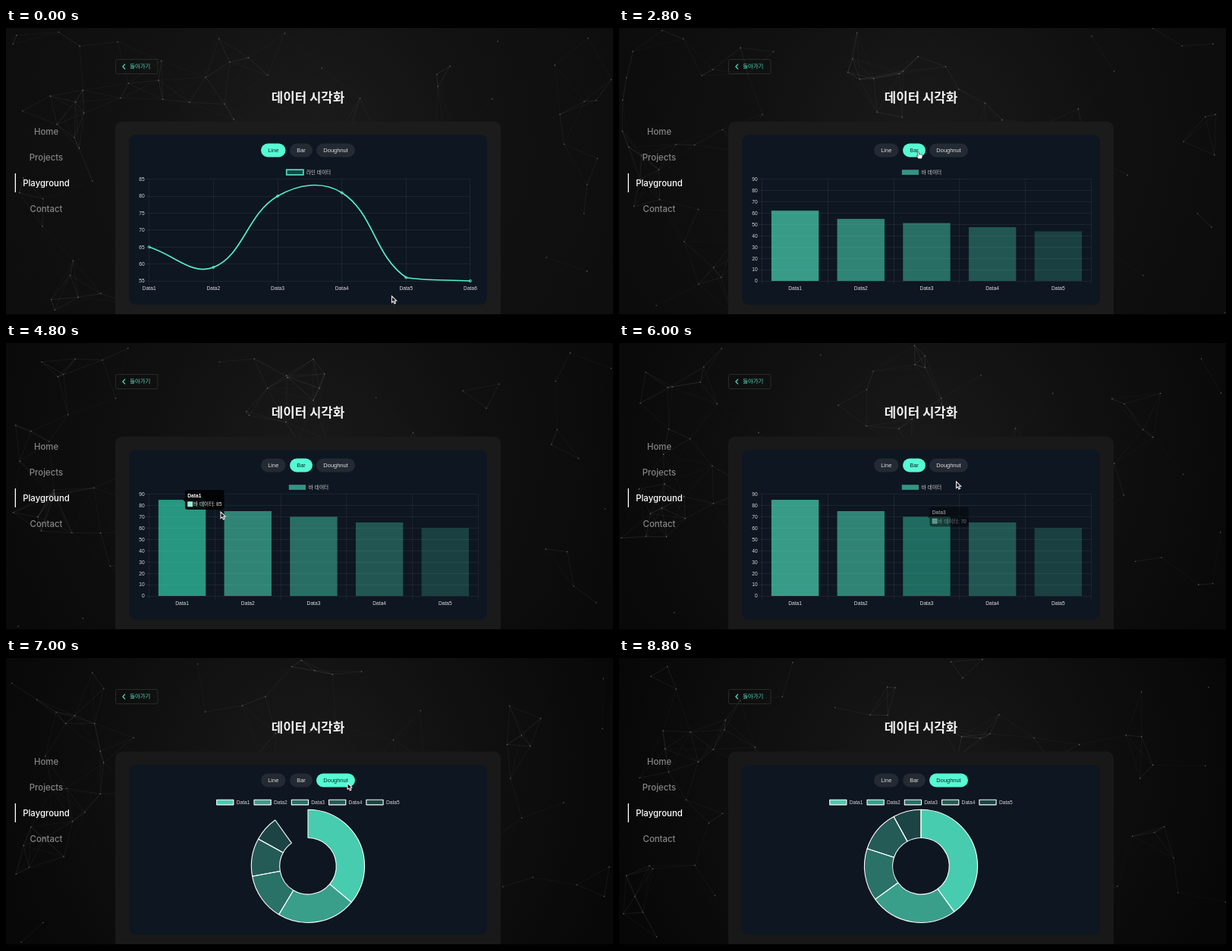
An HTML page with a canvas for the animation above (8.9 s loop, 800 by 379 pixels).

```html
<!DOCTYPE html>
<html lang="ko">
<head>
<meta charset="utf-8">
<title>데이터 시각화</title>
<style>
html, body { margin: 0; width: 100%; height: 100%; overflow: hidden; background: #0d0d0d; }
canvas { display: block; width: 800px; height: 379px; }
</style>
</head>
<body>
<canvas id="stage"></canvas>
<script>
const W = 800, H = 379, LOOP = 8900, STEP = 100;
const BAR_START = 2520, DOUGHNUT_START = 6560;
const SANS = '"Liberation Sans", "Noto Sans CJK KR", "Noto Sans CJK", sans-serif';
const KOREAN = '"Noto Sans CJK KR", "Noto Sans CJK", sans-serif';
const accent = alpha => `rgba(86,251,211,${alpha})`;
const lineValues = [65, 59, 80, 81, 56, 55];
const barValues = [85, 75, 70, 65, 60];
const shares = [.4, .25, .15, .12, .08];
const shareAlphas = [.8, .6, .4, .3, .2];
const LEFT = 188.7, TOP = 199.6, BOTTOM = 334;

const canvas = document.getElementById('stage');
const dpr = window.devicePixelRatio || 1;
canvas.width = W * dpr;
canvas.height = H * dpr;
const ctx = canvas.getContext('2d');
ctx.scale(dpr, dpr);

const clamp = v => Math.max(0, Math.min(1, v));
const mix = (a, b, p) => a + (b - a) * p;
const easeOut = p => 1 - (1 - clamp(p)) ** 4;
const smooth = p => p * p * (3 - 2 * p);

function text(str, x, y, size, color, align = 'center', weight = 400, family = SANS) {
  ctx.font = `${weight} ${size}px ${family}`;
  ctx.fillStyle = color;
  ctx.textAlign = align;
  ctx.textBaseline = 'alphabetic';
  ctx.fillText(str, x, y);
}

function box(x, y, w, h, r, fill, stroke, width = 1.1) {
  ctx.beginPath();
  ctx.roundRect(x, y, w, h, r);
  if (fill) { ctx.fillStyle = fill; ctx.fill(); }
  if (stroke) { ctx.strokeStyle = stroke; ctx.lineWidth = width; ctx.stroke(); }
}

function line(points, color, width) {
  ctx.beginPath();
  points.forEach(([x, y]) => ctx.lineTo(x, y));
  ctx.strokeStyle = color;
  ctx.lineWidth = width;
  ctx.stroke();
}

// Drifting particle network
let seed = 29;
const random = () => (seed = seed * 16807 % 2147483647) / 2147483647;
const particles = Array.from({ length: 100 }, () => {
  const angle = random() * Math.PI * 2, speed = 12 + random() * 22;
  return { x: random() * W, y: random() * H, vx: Math.cos(angle) * speed, vy: Math.sin(angle) * speed };
});
const bounce = (v, size) => {
  const m = ((v % (2 * size)) + 2 * size) % (2 * size);
  return m < size ? m : 2 * size - m;
};

function drawNetwork(t) {
  const reach = 70;
  const spots = particles.map(p => [bounce(p.x + p.vx * t / 1000, W), bounce(p.y + p.vy * t / 1000, H)]);
  spots.forEach((a, i) => {
    for (const b of spots.slice(i + 1)) {
      const d = Math.hypot(a[0] - b[0], a[1] - b[1]);
      if (d < reach) line([a, b], `rgba(190,190,190,${.04 + .2 * (1 - d / reach)})`, .6);
    }
    ctx.fillStyle = 'rgba(210,210,210,.38)';
    ctx.beginPath();
    ctx.arc(a[0], a[1], .8, 0, 7);
    ctx.fill();
  });
}

function drawPage(t) {
  const dim = t / LOOP;
  const gray = v => `rgb(${v},${v},${v})`;
  const glow = ctx.createRadialGradient(400, 150, 20, 400, 150, 430);
  glow.addColorStop(0, gray(27 - 3 * dim));
  glow.addColorStop(.5, gray(18 - 3 * dim));
  glow.addColorStop(1, gray(14 - 7 * dim));
  ctx.fillStyle = glow;
  ctx.fillRect(0, 0, W, H);
  drawNetwork(t);

  box(144, 123.5, 508, 270, 9, gray(28 - 4 * dim));
  box(162, 141, 472, 224.5, 9, '#0e1621');
  ctx.fillStyle = '#000';
  ctx.fillRect(0, 378, W, 1);

  box(144.5, 41.5, 55.5, 19, 2, null, '#2d3332', .8);
  line([[157, 47.7], [153.9, 51], [157, 54.3]], accent(.9), 1.2);
  text('돌아가기', 176.8, 53.4, 7.4, accent(.88), 'center', 500, KOREAN);
  text('데이터 시각화', 398, 98, 16.8, '#f2f2f2', 'center', 700, KOREAN);

  ['Home', 'Projects', 'Playground', 'Contact'].forEach((label, i) =>
    text(label, 53, 140.7 + i * 34, 11.4, i === 2 ? '#fff' : '#858585', 'center', 500, 'Inter, sans-serif'));
  ctx.fillStyle = '#fff';
  ctx.fillRect(11.7, 192, 1.3, 25);
}

function drawButtons(active) {
  [['Line', 336, 32.5], ['Bar', 374, 30], ['Doughnut', 409, 51]].forEach(([label, x, w], i) => {
    box(x, 152.5, w, 18, 9, i === active ? accent(1) : '#242a34');
    text(label, x + w / 2, 164.1, 7.45, i === active ? '#16202a' : '#dedede');
  });
}

function drawLegend(label, x, fill, stroke, width) {
  box(x, 187.2, 22.2, 6.7, 0, fill, stroke, width);
  text(label, x + 26, 192.9, 6.67, '#d4d4d4', 'left');
}

function drawGrid(xs, right, yMin, yMax, yStep) {
  const color = 'rgba(255,255,255,.1)';
  const snap = v => Math.round(v) + .5;
  for (let v = yMin; v <= yMax; v += yStep) {
    const y = mix(BOTTOM, TOP, (v - yMin) / (yMax - yMin));
    line([[LEFT - 4.5, snap(y - .5)], [right, snap(y - .5)]], color, .6);
    text(v, 182.7, y + 2.4, 6.67, '#dcdcdc', 'right');
  }
  xs.forEach(x => line([[snap(x - .5), TOP], [snap(x - .5), BOTTOM + 4.5]], color, .6));
}

function drawLineChart() {
  const points = lineValues.map((v, i) => [LEFT + i * 84.65, mix(BOTTOM, TOP, (v - 55) / 30)]);
  drawGrid(points.map(p => p[0]), 612, 55, 85, 5);
  drawLegend('라인 데이터', 369.7, accent(.2), accent(.85), 1.7);

  const distance = (a, b) => Math.hypot(a[0] - b[0], a[1] - b[1]);
  const handles = points.map((p, i) => {
    const before = points[i - 1] || p, after = points[i + 1] || p;
    const d1 = distance(before, p), d2 = distance(p, after);
    const handle = k => [
      p[0] + k * (after[0] - before[0]),
      Math.max(TOP, Math.min(BOTTOM, p[1] + k * (after[1] - before[1])))
    ];
    return { into: handle(-.4 * d1 / (d1 + d2)), out: handle(.4 * d2 / (d1 + d2)) };
  });
  ctx.beginPath();
  ctx.moveTo(...points[0]);
  for (let i = 1; i < points.length; i++)
    ctx.bezierCurveTo(...handles[i - 1].out, ...handles[i].into, ...points[i]);
  ctx.strokeStyle = accent(.95);
  ctx.lineWidth = 1.7;
  ctx.stroke();

  points.forEach(([x, y], i) => {
    ctx.beginPath();
    ctx.arc(x, y, 1.6, 0, 7);
    ctx.fillStyle = accent(.2);
    ctx.fill();
    ctx.strokeStyle = accent(.9);
    ctx.lineWidth = .8;
    ctx.stroke();
    text('Data' + (i + 1), x, 346.4, 6.67, '#dcdcdc');
  });
}

const hovers = [{ bar: 0, from: 4000, to: 4800 }, { bar: 1, from: 4900, to: 5300 }, { bar: 2, from: 5300, to: 5900 }];
const barX = i => LEFT + 86.7 * (i + .5);
const barY = (i, grow = 1) => mix(BOTTOM, TOP, barValues[i] * grow / 90);

function drawTooltip(t) {
  const index = hovers.findLastIndex(h => t >= h.from);
  if (index < 0) return;
  const { bar, from, to } = hovers[index];
  const fadeIn = index === 2 ? 1 : clamp((t - from) / 200);
  const alpha = Math.min(fadeIn, 1 - clamp((t - to) / 200));
  if (!alpha) return;
  const origin = index ? hovers[index - 1].bar : bar;
  const slide = easeOut((t - from) / 400);
  const x = mix(barX(origin), barX(bar), slide) + 3.9;
  const y = mix(barY(origin), barY(bar), slide);
  ctx.save();
  ctx.globalAlpha = alpha;
  ctx.fillStyle = 'rgba(0,0,0,.87)';
  ctx.beginPath();
  ctx.roundRect(x, y - 13, 51.5, 26, 3.3);
  ctx.moveTo(x, y - 2.8);
  ctx.lineTo(x - 2.8, y);
  ctx.lineTo(x, y + 2.8);
  ctx.fill();
  text('Data' + (bar + 1), x + 3.3, y - 3.2, 6.67, '#fff', 'left', 700);
  box(x + 3.6, y + 2.6, 6.3, 6.3, 0, '#9cf0de', '#e5fff9', .5);
  text('바 데이터: ' + barValues[bar], x + 11, y + 8.3, 6.67, '#e8e8e8', 'left');
  ctx.restore();
}

function drawBarChart(t) {
  drawGrid([0, 1, 2, 3, 4, 5].map(i => LEFT + i * 86.7), 622.2, 0, 90, 10);
  drawLegend('바 데이터', 372.8, accent(.55));
  const grow = easeOut((t - BAR_START) / 1000);
  barValues.forEach((_, i) => {
    const y = barY(i, grow), alpha = .58 - i * .1;
    const hovered = hovers.some(h => h.bar === i && t >= h.from && t <= h.to + 100);
    ctx.fillStyle = hovered ? `rgba(58,245,200,${alpha})` : accent(alpha);
    ctx.fillRect(barX(i) - 31.2, y, 62.4, BOTTOM - y);
    text('Data' + (i + 1), barX(i), 346.4, 6.67, '#dcdcdc');
  });
  drawTooltip(t);
}

function drawDoughnut(t) {
  const sweep = 2 * Math.PI * easeOut((t - DOUGHNUT_START) / 1000);
  let angle = -Math.PI / 2;
  shares.forEach((share, i) => {
    drawLegend('Data' + (i + 1), 277.7 + i * 49.3, accent(shareAlphas[i]), '#fff', 1.1);
    const end = angle + share * sweep;
    ctx.beginPath();
    ctx.arc(398, 274.8, 74.6, angle, end);
    ctx.arc(398, 274.8, 37.3, end, angle, true);
    ctx.closePath();
    ctx.fillStyle = accent(shareAlphas[i]);
    ctx.fill();
    ctx.strokeStyle = '#fff';
    ctx.lineWidth = 1.1;
    ctx.lineJoin = 'bevel';
    ctx.stroke();
    angle = end;
  });
}

// Pointer stops: time, x, y
const route = [
  [0, 508.5, 354], [400, 508.5, 354], [1600, 394, 163], [3000, 394, 163], [4200, 236, 268],
  [4500, 245, 262], [4800, 283, 223], [5100, 320, 258], [5500, 405, 262], [6000, 444.5, 183],
  [6400, 436, 163], [7000, 450, 165], [7500, 450, 165], [8500, 540, 390]
];

function drawPointer(t) {
  const next = route.findIndex(stop => stop[0] > t);
  if (next < 0) return;
  const [t0, x0, y0] = route[next - 1], [t1, x1, y1] = route[next];
  const p = smooth((t - t0) / (t1 - t0));
  const hand = (t >= 1800 && t < 3100) || (t >= 6300 && t < 6900);
  const shape = hand
    ? 'M-1 1Q0-.6 1 1L1.6 4 2.6 3.4 3.4 4.2 4.4 3.8 5 4.8 5.9 4.7 6 7 4.8 9.8H.8L-2 6.4-1.4 5.5.2 6.4Z'
    : 'M0 0V8.6L2 6.8 3.4 10 5 9.3 3.6 6.2H6.2Z';
  ctx.save();
  ctx.translate(mix(x0, x1, p), mix(y0, y1, p));
  const path = new Path2D(shape);
  ctx.lineWidth = hand ? .6 : 1.1;
  ctx.strokeStyle = hand ? '#111' : '#eee';
  ctx.fillStyle = hand ? '#fff' : '#080808';
  ctx.fill(path);
  ctx.stroke(path);
  ctx.restore();
}

function render(t) {
  const active = t < 2500 ? 0 : t < 6500 ? 1 : 2;
  drawPage(t);
  drawButtons(active);
  [drawLineChart, drawBarChart, drawDoughnut][active](t);
  drawPointer(t);
}

const start = performance.now();
function tick() {
  const t = (performance.now() - start) % LOOP;
  render(Math.floor(t / STEP) * STEP);
  requestAnimationFrame(tick);
}
tick();
</script>
</body>
</html>
```
